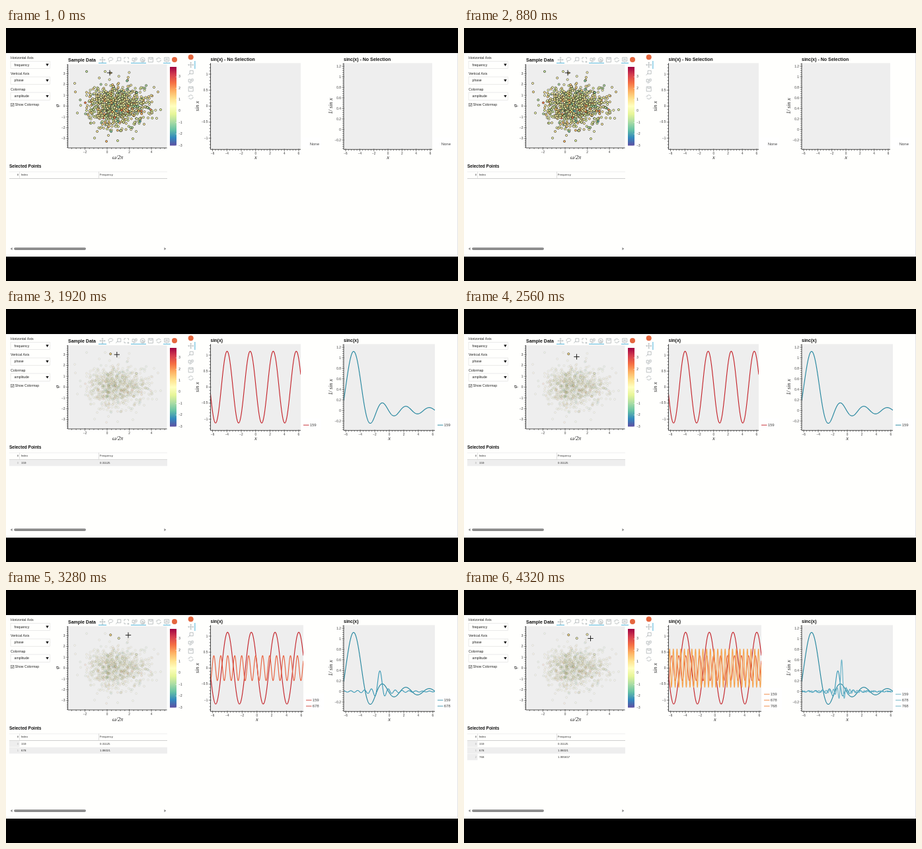
Write an HTML page with a canvas that moves like this. It is 684 px wide and 384 px high and loops after 4400 ms.

```html
<!DOCTYPE html>
<html lang="en">
<head>
<meta charset="utf-8">
<title>Linked selection dashboard</title>
<style>
  html, body { margin: 0; width: 100%; height: 100%; overflow: hidden; background: #000; }
  canvas { display: block; width: 684px; height: 384px; }
</style>
</head>
<body>
<canvas id="stage"></canvas>
<script>
const LOOP = 4400, STEP = 80, TAU = Math.PI * 2;
const canvas = document.getElementById('stage');
const scale = window.devicePixelRatio || 1;
canvas.width = 684 * scale;
canvas.height = 384 * scale;
const c = canvas.getContext('2d');

const SANS = '"Liberation Sans", Arial, sans-serif';
const MATH = '"Liberation Serif", "Times New Roman", serif';
const SPECTRAL = ['#5e4fa2', '#3288bd', '#66c2a5', '#abdda4', '#e6f598', '#ffffbf',
  '#fee08b', '#fdae61', '#f46d43', '#d53e4f', '#9e0142'];

// A wave's frequency and phase are also its place in the scatter plot.
const waves = [
  { id: 159, label: '0.31125', freq: 0.31125, phase: 3.06, amp: 1.12, warm: '#c4242b', cool: '#26879f' },
  { id: 678, label: '1.06021', freq: 1.06021, phase: 2.75, amp: 0.39, warm: '#e9623f', cool: '#3c9ab6' },
  { id: 768, label: '1.995657', freq: 1.995657, phase: 3.1, amp: 0.6, warm: '#f7a24a', cool: '#6ab3c8' }
];
const pickTimes = [1280, 2880, 4000];
const plotTimes = [1600, 3120, 4160];
const cursorPath = [[0, 157, 68], [1200, 157, 68], [1440, 166, 67], [1760, 166, 67],
  [2160, 170.5, 72.5], [2880, 170.5, 72.5], [3200, 185, 68.5], [4000, 185, 68.5], [4240, 191.5, 73.5], [LOOP, 191.5, 73.5]];

const scatterX = f => 153 + f * 16.75;
const scatterY = p => 118.5 - p * 16.45;

let seed = 20;
function random() {
  seed = (seed + 0x6d2b79f5) | 0;
  let n = Math.imul(seed ^ (seed >>> 15), 1 | seed);
  n = (n + Math.imul(n ^ (n >>> 7), 61 | n)) ^ n;
  return ((n ^ (n >>> 14)) >>> 0) / 4294967296;
}
const normal = () => Math.sqrt(-2 * Math.log(1 - random())) * Math.cos(TAU * random());
const randomFill = () => spectral(0.3 + normal() * 0.75);

function spectral(amp) {
  const pos = Math.max(0, Math.min(9.999, (amp + 3) / 6.87 * 10)), i = Math.floor(pos);
  const part = (hex, k) => parseInt(hex.slice(k, k + 2), 16);
  const mix = [1, 3, 5].map(k => part(SPECTRAL[i], k) * (1 - pos + i) + part(SPECTRAL[i + 1], k) * (pos - i));
  return `rgb(${mix.map(Math.round)})`;
}

const dots = [[122, 66], [150, 66], [104, 84], [105, 97], [230, 97], [224, 90], [234, 124], [228, 137],
  [221, 129], [108, 129], [134, 167], [138, 157], [152, 172], [169, 171], [192, 168], [197, 157], [209, 146], [155, 163]]
  .map(([x, y]) => ({ x, y, fill: randomFill() }));
while (dots.length < 900) {
  const right = random() < 0.36;
  const x = scatterX(right ? 2.1 + normal() * 1.05 : 0.2 + normal() * 0.95);
  const y = scatterY(normal() * 0.93);
  if (((x - 166) / 62) ** 2 + ((y - 117) / 45) ** 2 < 1) dots.push({ x, y, fill: randomFill() });
}
const picks = waves.map(w => ({ x: scatterX(w.freq), y: scatterY(w.phase), fill: spectral(w.amp) }));

function text(str, x, y, size = 5.2, align = 'left', color = '#222', style = '', family = SANS) {
  c.font = `${style} ${size}px ${family}`;
  c.textAlign = align;
  c.textBaseline = 'middle';
  c.fillStyle = color;
  c.fillText(str, x, y);
}
const math = (str, x, y) => text(str, x, y, 8.4, 'center', '#222', 'italic', MATH);
function rect(x, y, w, h, color) {
  c.fillStyle = color;
  c.fillRect(x, y, w, h);
}
function stroke(path, color, width = 0.8) {
  c.strokeStyle = color;
  c.lineWidth = width;
  c.stroke(new Path2D(path));
}
function disc(x, y, r, color) {
  c.fillStyle = color;
  c.beginPath();
  c.arc(x, y, r, 0, TAU);
  c.fill();
}
function dot({ x, y, fill }) {
  disc(x, y, 1.6, fill);
  c.strokeStyle = '#1c1c14';
  c.lineWidth = 0.55;
  c.stroke();
}
function turned(str, x, y) {
  c.save();
  c.translate(x, y);
  c.rotate(-Math.PI / 2);
  math(str, 0, 0);
  c.restore();
}

// Ticks at a fifth of each labelled step; unit is pixels per value.
function axis(vertical, base, from, to, zero, unit, step) {
  const line = (a, b, d, e) => vertical ? `M${b} ${a}L${e} ${d}` : `M${a} ${b}L${d} ${e}`;
  stroke(line(from, base, to, base), '#222', 0.8);
  const out = vertical ? -1 : 1;
  for (let k = -60; k <= 60; k++) {
    const at = zero + k * step / 5 * unit;
    if (at < from || at > to) continue;
    const major = k % 5 === 0;
    stroke(line(at, base - (major ? out : 0), at, base + out * (major ? 2.8 : 1.8)), '#222', 0.6);
    if (!major) continue;
    const label = String(+(k / 5 * step).toFixed(2)).replace('-', '−');
    if (vertical) text(label, base - 4.2, at + 0.3, 4.7, 'right', '#333');
    else text(label, at, base + 6.3, 4.7, 'center', '#333');
  }
}

const ICONS = {
  pan: 'M-4 0H4M0-4V4M-2.8-1.2L-4 0L-2.8 1.2M2.8-1.2L4 0L2.8 1.2M-1.2-2.8L0-4L1.2-2.8M-1.2 2.8L0 4L1.2 2.8',
  lasso: 'M-2 1C-5-1-2-4 1-3.5C5-3 4 1 0 1.2C-3 1.4-3 3-1 3.6',
  zoom: 'M-1.5-3.5H3.5V1.5H-1.5ZM-1.5 .5L-4 3.5',
  box: 'M-3.5-1V-3.5H-1M1-3.5H3V-1M-3.5 1V3H-1M1 3H4M2.5 1.5V4.5',
  wheel: 'M-3.5-2.5H-.5V1.5H-3.5ZM1-3H3.5V0H1ZM-2 3.5L2 1.5',
  tap: 'M-3.5 0A3.5 3.5 0 1 1 3.5 0A3.5 3.5 0 1 1-3.5 0M-1-1V2H2V0H0V-1Z',
  save: 'M-3.5-3.5H3.5V3.5H-3.5ZM-1.5-3.5V-1H2V-3.5',
  reset: 'M-3-1A3.2 3.2 0 0 1 3-1M3 1A3.2 3.2 0 0 1-3 1M-4-.5L-3-1.5L-1.8-.3M4 .5L3 1.5L1.8 .3',
  hover: 'M-3.5-3.5H3.5V2H1L0 3.5L-1 2H-3.5ZM-2-1.5H2M-2 .2H2'
};
function icon(name, x, y) {
  c.save();
  c.translate(x, y);
  stroke(ICONS[name], '#a3a9ad', 0.7);
  c.restore();
}

function sidebar() {
  [['Horizontal Axis', 'frequency'], ['Vertical Axis', 'phase'], ['Colormap', 'amplitude']].forEach(([name, value], i) => {
    const y = 56 + i * 23.8;
    text(name, 7, y - 10.3);
    c.strokeStyle = '#dcdcdc';
    c.lineWidth = 0.6;
    c.strokeRect(7, y - 5.7, 59.5, 11.4);
    text(value, 12.5, y + 0.2);
    c.fillStyle = '#111';
    c.fill(new Path2D(`M60.3 ${y - 1.7}h4.4l-2.2 3.6z`));
  });
  c.strokeStyle = '#555';
  c.strokeRect(7.6, 114.4, 4.4, 4.4);
  stroke('M8.5 116.5L9.5 117.6L11.3 115.2', '#333', 0.8);
  text('Show Colormap', 13.8, 116.8, 5.1);
}

function toolbars() {
  ['pan', 'lasso', 'zoom', 'box', 'wheel', 'tap', 'save', 'reset', 'hover']
    .forEach((name, i) => icon(name, 146 + i * 12.15, 48.3));
  [[140, 12], [189, 23], [238, 11]].forEach(([x, w]) => rect(x, 52.7, w, 1, '#4db3d9'));
  ['pan', 'zoom', 'wheel', 'save', 'reset'].forEach((name, i) => icon(name, 279.7, 56 + i * 12.2));
  rect(285.4, 50, 1, 12, '#4db3d9');
  disc(255, 48, 4, '#e5673f');
  disc(279.7, 44.3, 4, '#e5673f');
}

function scatter(picked) {
  text('Sample Data', 94, 49.2, 7, 'left', '#111', 'bold');
  rect(94, 55, 149.5, 126.8, '#eeeeee');
  c.globalAlpha = picked ? 0.1 : 1;
  dots.forEach(dot);
  picks.slice(picked).forEach(dot);
  c.globalAlpha = 1;
  picks.slice(0, picked).forEach(dot);
  axis(true, 93.5, 55, 182, 118.5, -16.45, 1);
  axis(false, 182, 93.5, 243.5, 153, 16.75, 2);
  turned('φ', 77.5, 118);
  math('ω/2π', 169, 197);

  const ramp = c.createLinearGradient(0, 178.5, 0, 59);
  SPECTRAL.forEach((color, i) => ramp.addColorStop(i / 10, color));
  rect(248, 59, 10, 119.5, ramp);
  for (let v = -3; v <= 3; v++) {
    const y = 126.2 - v * 17.35;
    stroke(`M256.5 ${y}H258`, '#fff', 0.5);
    text(String(v).replace('-', '−'), 261.2, y, 4.7, 'left', '#333');
  }
}

function wavePlot(p, shown) {
  const width = p.right - p.left, mid = p.left + width / 2, unit = width / (2 * TAU);
  text(p.title + (shown ? '' : ' - No Selection'), p.left, 47.7, 7, 'left', '#111', 'bold');
  rect(p.left, 53.3, width, 131, '#eeeeee');
  c.save();
  c.beginPath();
  c.rect(p.left, 53.3, width, 131);
  c.clip();
  c.lineJoin = 'round';
  waves.slice(0, shown).forEach(w => {
    c.beginPath();
    for (let x = p.left; x <= p.right; x += 0.25)
      c.lineTo(x, p.zero - p.unit * w.amp * p.curve((x - mid) / unit, w));
    c.strokeStyle = w[p.tone];
    c.lineWidth = 1.15;
    c.stroke();
  });
  c.restore();
  axis(true, p.left, 53.3, 184.3, p.zero, -p.unit, p.step);
  axis(false, 184.3, p.left, p.right, mid, unit, 2);
  turned(p.label, p.left - 19.5, 118.5);
  math('x', mid, 197);

  const rows = Math.max(1, shown);
  rect(p.right + 1, 175.5 - rows * 9, 30, rows * 9 + 7.5, '#fff');
  if (!shown) text('None', p.right + 13.7, 176.2, 6, 'left', '#444');
  waves.slice(0, shown).forEach((w, i) => {
    const y = 176.2 - (shown - 1 - i) * 9;
    stroke(`M${p.right + 4} ${y}h8.5`, p.legend[shown - 1], 1);
    text(w.id, p.right + 13.7, y, 6, 'left', '#444');
  });
}

function table(shown) {
  text('Selected Points', 5, 210, 6.5, 'left', '#111', 'bold');
  rect(5, 217.8, 239, 0.6, '#e4e4e4');
  rect(5, 228, 239, 0.7, '#bbb');
  rect(20.3, 218, 0.5, 10, '#ccc');
  rect(140.3, 218, 0.5, 10, '#bbb');
  text('#', 18, 223.2, 4.2, 'center');
  text('Index', 22.8, 223.2, 4.2);
  text('Frequency', 142, 223.2, 4.2);
  waves.slice(0, shown).forEach((w, i) => {
    const y = 228.7 + i * 10;
    rect(5, y, i === 1 || shown === 1 ? 239 : 15.5, 9.6, '#eeeeee');
    text(i, 18, y + 4.7, 4.2, 'center', '#aaa');
    text(w.id, 23, y + 4.7, 4.4);
    text(w.label, 142, y + 4.7, 4.4);
  });
  c.fillStyle = '#8b8b8b';
  c.beginPath();
  c.roundRect(12, 333.3, 109, 3.6, 1.8);
  c.fill();
  c.fill(new Path2D('M9.6 333v4.2l-3-2.1zM239.4 333v4.2l3-2.1z'));
}

function cursor(t) {
  const i = cursorPath.findIndex(k => k[0] > t);
  const [t0, x0, y0] = cursorPath[i - 1], [t1, x1, y1] = cursorPath[i];
  const u = (t - t0) / (t1 - t0), x = x0 + (x1 - x0) * u, y = y0 + (y1 - y0) * u;
  stroke(`M${x - 4.2} ${y}h8.4M${x} ${y - 4.2}v8.4`, '#222', 1);
}

function draw(t) {
  const count = times => times.filter(s => t >= s).length;
  const shown = count(plotTimes);
  c.setTransform(scale, 0, 0, scale, 0, 0);
  rect(0, 0, 684, 384, '#000');
  rect(0, 38, 684, 309, '#fffffd');
  rect(683, 38, 1, 309, '#e4e4e4');
  sidebar();
  toolbars();
  scatter(count(pickTimes));
  wavePlot({
    title: 'sin(x)', label: 'sin x', left: 309.5, right: shown < 2 ? 446 : 450,
    zero: 118.6, unit: 48.6, step: 0.5, tone: 'warm', legend: ['#c8353a', '#d05048', '#f08f4c'],
    curve: (x, w) => Math.sin(TAU * w.freq * x + w.phase)
  }, shown);
  wavePlot({
    title: 'sinc(x)', label: '1/ sin x', left: 511, right: shown ? 649 : 645,
    zero: 154, unit: 80, step: 0.2, tone: 'cool', legend: ['#2f8ca3', '#4c9cb4', '#70b4c6'],
    curve: (x, w) => {
      const u = Math.PI * (2 * w.freq * x + w.phase);
      return Math.abs(u) < 1e-6 ? 1 : Math.sin(u) / u;
    }
  }, shown);
  table(shown);
  cursor(t);
}

const start = performance.now();
let last = -1;
function tick() {
  const t = Math.floor((performance.now() - start) % LOOP / STEP) * STEP;
  if (t !== last) draw(last = t);
  requestAnimationFrame(tick);
}
tick();
</script>
</body>
</html>
```
